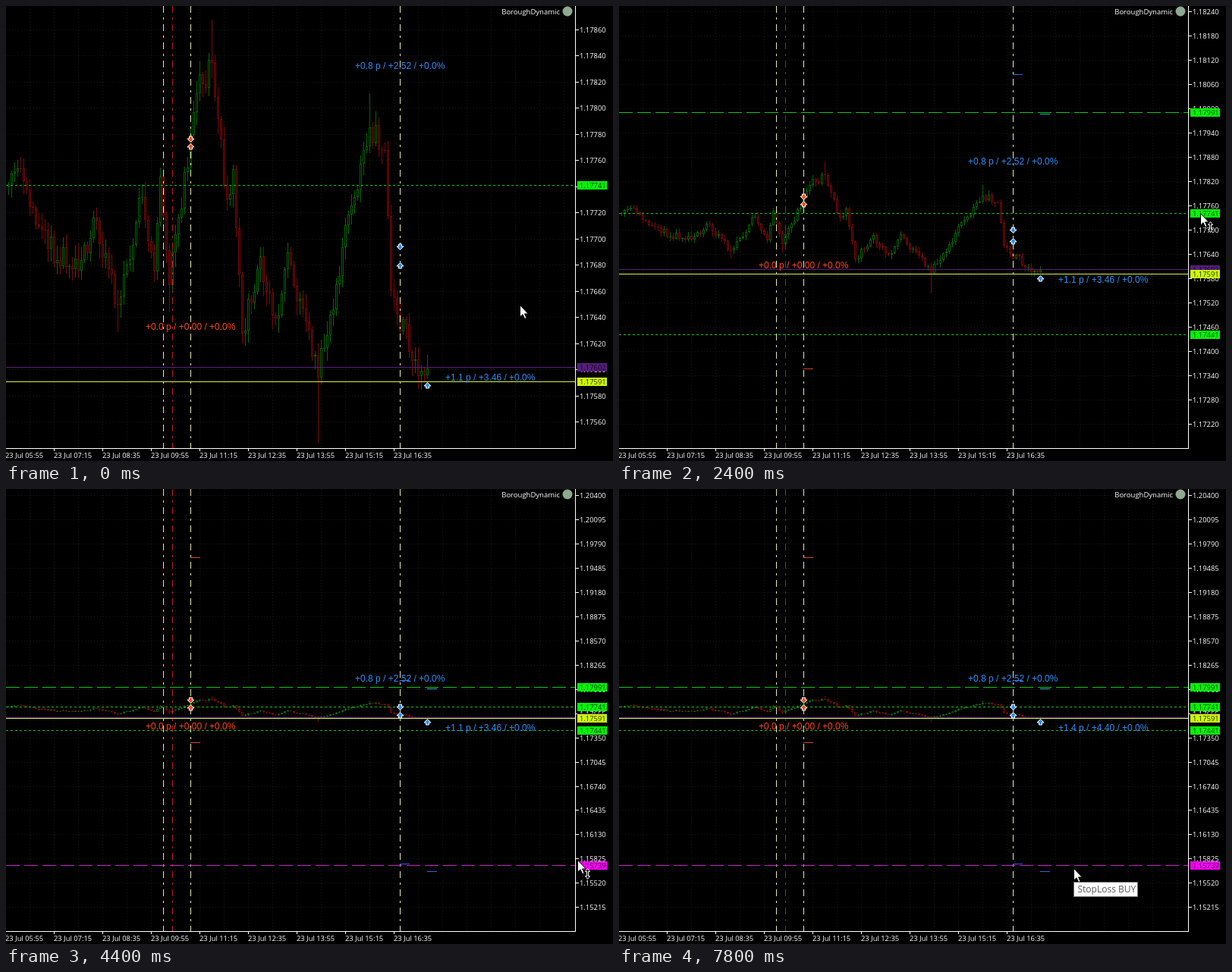
An HTML page with a canvas that plays this animation: 800 by 600 pixels, repeating every 8 s.

```html
<!DOCTYPE html>
<html lang="en">
<head>
<meta charset="utf-8">
<title>Chart scale drag</title>
<style>
html, body { margin: 0; width: 100%; height: 100%; overflow: hidden; background: #000; }
canvas { display: block; }
</style>
</head>
<body>
<canvas id="stage" width="800" height="600"></canvas>
<script>
const ctx = document.getElementById('stage').getContext('2d');
const W = 750, H = 583, MID = 290, MID_PRICE = 117709.7;
const STEP = 200, STEPS = 40, BARS = 139;
const UI = '"Open Sans", "Noto Sans", sans-serif';
const ARIAL = '"Liberation Sans", Arial, sans-serif';
const BLUE = '#2f8cf5', ORANGE = '#ff4818';
const UP = '#076207', DOWN = '#740a0a';
const DOT = [3, 3], DASH = [18, 6], DASH_DOT = [9, 6, 3, 6], GRID = [1, 3];

// Pixels per point, and pointer place, at key steps
const ZOOM = [[6, 1.7233], [7, 1.3973], [12, .5333], [16, .25506], [19, .14679], [21, .10473]];
const POINTER = [[0, 677, 394], [6, 780, 143], [7, 775, 166], [12, 766, 273], [16, 758, 356],
  [19, 759, 413], [24, 749, 540], [27, 652, 496], [30, 599, 500]];

// Turning points of the price: bar, height at the first zoom, wick length
const SWINGS = [[0, 235], [3, 214], [13, 320], [24, 335], [29, 283], [36, 394, 36], [44, 252], [48, 350],
  [50, 225], [53, 368, 36], [60, 170], [62, 115], [67, 75, 53], [72, 255], [74, 215], [77, 432], [83, 330],
  [88, 412], [92, 325], [102, 490, 86], [112, 275], [119, 160, 45], [124, 190], [126, 375], [135, 488], [138, 478]];

function track(keys, i, col = 1) {
  if (i <= keys[0][0]) return keys[0][col];
  const k = keys.findIndex(key => i <= key[0]);
  if (k < 0) return keys[keys.length - 1][col];
  const a = keys[k - 1], b = keys[k];
  return a[col] + (b[col] - a[col]) * (i - a[0]) / (b[0] - a[0]);
}

const zoomKeys = ZOOM.map(([i, z]) => [i, Math.log(z)]);

function makeBars() {
  let seed = 11, open = 238;
  const rand = () => (seed = seed * 16807 % 2147483647) / 2147483647;
  const bars = [];
  for (let i = 0; i < BARS; i++) {
    const swing = SWINGS.find(s => s[0] === i);
    const close = track(SWINGS, i) + (swing ? 0 : (rand() - .5) * 36);
    const top = Math.min(open, close), end = Math.max(open, close);
    const long = swing && swing[2] || 0, isLow = close > MID;
    const high = top - (long && !isLow ? long : 3 + rand() * 17);
    const low = end + (long && isLow ? long : 3 + rand() * 17);
    bars.push({ up: close < open, ys: [high, top, end, low].map(y => (y - MID) / ZOOM[0][1]) });
    open = close;
  }
  return bars;
}
const bars = makeBars();

let zoom;
const yAt = (points, gap = 0) => Math.round(MID + gap + points * zoom);
const yOf = price => yAt(MID_PRICE - price);

function rect(x, y, w, h, color) {
  ctx.fillStyle = color;
  ctx.fillRect(x, y, w, h);
}

function disc(x, y, r, color) {
  ctx.fillStyle = color;
  ctx.beginPath();
  ctx.arc(x, y, r, 0, 7);
  ctx.fill();
}

function line(x1, y1, x2, y2, color, dash) {
  ctx.strokeStyle = color;
  ctx.lineWidth = 1;
  ctx.setLineDash(dash);
  ctx.beginPath();
  ctx.moveTo(x1, y1);
  ctx.lineTo(x2, y2);
  ctx.stroke();
  ctx.setLineDash([]);
}
const hline = (y, color, dash = []) => line(0, y + .5, W, y + .5, color, dash);
const vline = (x, color, dash = []) => line(x + .5, 0, x + .5, H, color, dash);

function text(str, x, y, color, font, align = 'left') {
  ctx.fillStyle = color;
  ctx.font = font;
  ctx.textAlign = align;
  ctx.fillText(str, x, y);
}

function shape(x, y, points, fill, stroke, flip = 1) {
  ctx.beginPath();
  for (let k = 0; k < points.length; k += 2) ctx.lineTo(x + .5 + points[k], y + .5 + points[k + 1] * flip);
  ctx.closePath();
  ctx.lineWidth = 1;
  ctx.strokeStyle = stroke;
  ctx.fillStyle = fill;
  ctx.fill();
  ctx.stroke();
}

function axisLevels() {
  const step = Math.round(32 / zoom / 5) * 5;
  const bottom = MID_PRICE - (H - MID) / zoom;
  const levels = [];
  for (let p = Math.round(bottom / 10) * 10 + step; yOf(p) > 0; p += step) levels.push(p);
  return levels;
}

function drawGrid(levels) {
  for (let x = 31; x < W; x += 32) vline(x, '#191919', GRID);
  for (const p of levels) hline(yOf(p), '#191919', GRID);
}

function drawBars() {
  bars.forEach(({ up, ys }, i) => {
    const x = 3 + i * 4, color = up ? UP : DOWN;
    const [high, top, end, low] = ys.map(v => yAt(v));
    const h = Math.max(1, end - top);
    rect(x, high, 1, Math.max(1, low - high), color);
    rect(x - 1, top, 3, h, color);
    if (h > 2) rect(x, top + 1, 1, h - 2, up ? '#000' : '#280000');
  });
}

function drawLines() {
  for (const x of [207, 243, 519]) vline(x, '#e8e8ac', DASH_DOT);
  vline(219, '#b81a1a', DASH_DOT);
  hline(yOf(117602), '#5c1e7e');
  hline(yOf(117991), '#14c414', DASH);
  hline(yOf(117741), '#14c414', DOT);
  hline(yOf(117441), '#14c414', DOT);
  hline(yOf(115739), '#d414d4', DASH);
  hline(yOf(117591), '#d8f048');
}

function drawTrade(x, points, dir, color) {
  const arrow = [0, -4, 4.5, .5, 2, .5, 2, 3.5, -2, 3.5, -2, .5, -4.5, .5];
  shape(x, yAt(points, dir * 5), arrow, color, '#fff', dir);
}

// Highs sit a little below their price, lows somewhat more
function drawStop(x, points, color) {
  rect(x, yAt(points, points < 0 ? 2 : 9), 13, 1, color);
}

function drawNote(str, x, points, gap, color) {
  text(str, x, yAt(points, gap) + 4, color, '12px ' + ARIAL);
}

function drawClosed() {
  drawStop(243, -1926, '#d04824');
  drawStop(243, 336, '#d04824');
  drawStop(519, -378, '#3c5ce0');
  drawStop(519, 1866, '#3c5ce0');
  drawStop(555, 1957, '#3c5ce0');
  drawTrade(243, -64, -1, ORANGE);
  drawTrade(243, -64, 1, ORANGE);
  drawTrade(519, 18.5, -1, BLUE);
  drawTrade(519, 27.5, 1, BLUE);
  drawNote('+0.8 p / +2.52 / +0.0%', 460, -105.6, -29, BLUE);
  drawNote('+0.0 p / +0.00 / +0.0%', 184, 68, 16, ORANGE);
}

function drawOpen(i) {
  drawStop(555, -281, '#20b4b4');
  drawTrade(555, 119.2, 1, BLUE);
  const gain = i < 31 ? '+1.1 p / +3.46' : '+1.4 p / +4.40';
  drawNote(gain + ' / +0.0%', 579, 108, 13.5, BLUE);
}

function drawAxes(levels) {
  const font = '9.4px ' + UI;
  const two = n => String(n).padStart(2, '0');
  const price = (p, y, color) => text((p / 1e5).toFixed(5), 756, y + 3.5, color, font);
  rect(0, H, W + 1, 1, '#fff');
  rect(W, 0, 1, H + 1, '#fff');
  for (const p of levels) {
    rect(W, yOf(p), 5, 1, '#fff');
    price(p, yOf(p), '#fff');
  }
  for (let k = 0; k < 9; k++) {
    const min = 355 + k * 80, x = k * 64 - 1;
    if (k) rect(x, H, 1, 4, '#fff');
    text(`23 Jul ${two(Math.floor(min / 60))}:${two(min % 60)}`, x, 596, '#fff', font);
  }
  const tag = (p, fill, ink) => {
    const y = yOf(p);
    if (y < -6 || y > H) return;
    rect(753, y - 5, 39, 11, fill);
    price(p, y, ink);
  };
  tag(117602, '#56207a', '#160420');
  for (const p of [117741, 117991, 117441]) tag(p, '#00f800', '#003c00');
  tag(115739, '#f800f8', '#400040');
  tag(117591, '#ccfa08', '#283000');
}

function drawTitle() {
  text('BoroughDynamic', 730, 11, '#fff', '9.5px ' + UI, 'right');
  disc(740, 7, 6.5, '#8fa890');
}

function drawPointer(i) {
  const x = Math.round(track(POINTER, i, 1)), y = Math.round(track(POINTER, i, 2));
  if (i === 6 || i === 7) disc(780, 145, 18, i === 6 ? '#780000' : '#380000');
  if (i >= 5 && i <= 27) {
    const resize = [0, -7, 3, -3, 1, -3, 1, 3, 3, 3, 0, 7, -3, 3, -1, 3, -1, -3, -3, -3];
    shape(x + 13, y + 18, resize, '#000', '#fff');
  }
  shape(x, y, [0, 0, 0, 15.5, 3.5, 12.2, 6.2, 18, 8.5, 17, 6, 11.4, 10.8, 11.4], '#fff', '#000');
  if (i >= 34) {
    rect(599, 518, 85, 20, '#767676');
    rect(600, 519, 83, 18, '#fff');
    text('StopLoss BUY', 604.5, 532, '#5a5a5a', '12px ' + UI);
  }
}

function draw(i) {
  zoom = Math.exp(track(zoomKeys, i));
  const levels = axisLevels(), redrawing = i === 16;
  rect(0, 0, 800, 600, '#000');
  ctx.save();
  ctx.beginPath();
  ctx.rect(0, 0, W, H);
  ctx.clip();
  drawGrid(levels);
  drawBars();
  drawLines();
  if (!redrawing) drawClosed();
  drawOpen(i);
  ctx.restore();
  drawAxes(levels);
  drawTitle();
  drawPointer(i);
}

const start = performance.now();
function tick() {
  draw(Math.floor((performance.now() - start) / STEP) % STEPS);
  requestAnimationFrame(tick);
}
tick();
</script>
</body>
</html>
```
